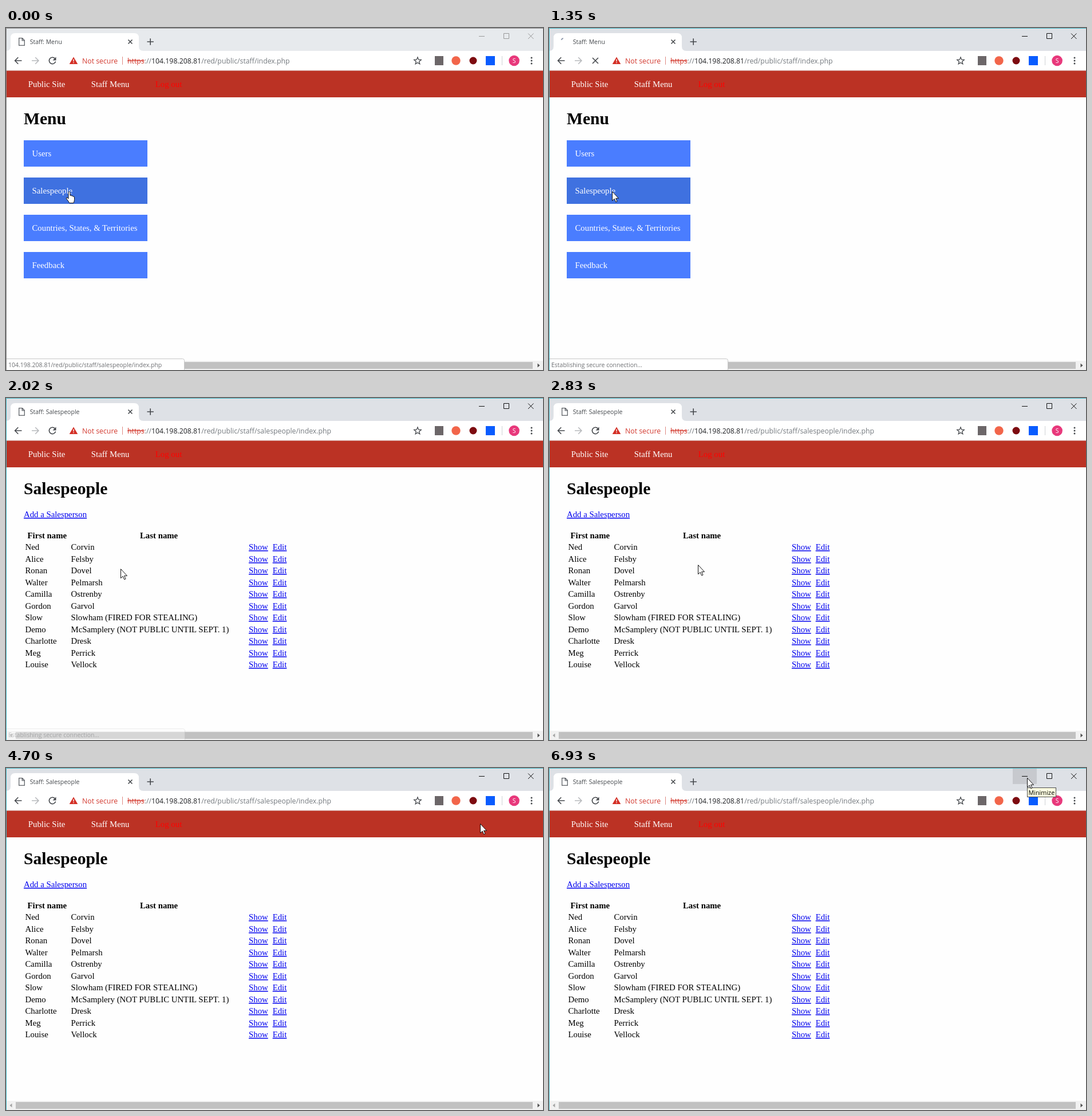
Recreate the animation shown at these times as an HTML page. Size 938 by 597 pixels, loop 8 s.

```html
<!DOCTYPE html>
<html lang="en">
<head>
<meta charset="utf-8">
<title>Staff pages</title>
<style>
  html, body { margin: 0; width: 100%; height: 100%; overflow: hidden; background: #fefefe; }
  svg { display: block; }
  text { white-space: pre; }
  rect { shape-rendering: crispEdges; }
  .soft { shape-rendering: auto; }
  .ui { font: 12.3px "Open Sans", "Noto Sans", sans-serif; }
  .small { font: 10.5px "Open Sans", "Noto Sans", sans-serif; }
  .page { font: 14.8px "Liberation Serif", serif; }
  .title { font: bold 29.6px "Liberation Serif", serif; }
  .bold { font-weight: bold; }
  .link { fill: #00e; text-decoration: underline; }
  .line { fill: none; stroke: #46494d; stroke-width: 1.6; }
</style>
</head>
<body>
<svg width="938" height="597" viewBox="0 0 938 597">
  <defs>
    <linearGradient id="fade">
      <stop offset="0" stop-color="#fff" stop-opacity="0"/>
      <stop offset="1" stop-color="#fff"/>
    </linearGradient>
  </defs>

  <!-- Title bar and tab -->
  <rect id="bar" width="938" height="40"/>
  <path d="M0 40Q8 40 8 32V17Q8 9 16 9H224Q232 9 232 17V32Q232 40 240 40Z" fill="#fff"/>
  <path id="docIcon" d="M22.7 17.7H28.5L32.3 21.5V30.3H22.7ZM28.2 17.7V21.8H32.3" fill="none" stroke="#5f6368" stroke-width="1.3"/>
  <path id="spinner" fill="none" stroke="#8d98ab" stroke-width="1.8"/>
  <text id="tabTitle" class="small" x="41.7" y="28" fill="#45494d"/>
  <rect x="183" y="14" width="22" height="20" fill="url(#fade)"/>
  <rect x="205" y="14" width="6" height="20" fill="#fff"/>
  <path class="line" d="M213.5 20.5l7 7m0-7l-7 7M246.5 24h11.4M252.2 18.3v11.4"/>
  <rect id="hover" x="810" y="1" width="42" height="27" fill="#c7c9ce"/>
  <path id="windowButtons" d="M826 14.5h10M869.5 9.5h9v9h-9ZM912 9.5l9.5 9.5m0-9.5l-9.5 9.5" fill="none"/>

  <!-- Toolbar -->
  <rect y="40" width="938" height="34" fill="#fff"/>
  <path class="line" d="M27.5 57H16M21.3 51.3L15.6 57l5.7 5.7"/>
  <path class="line" d="M45 57H56.5M51.2 51.3L56.9 57l-5.7 5.7" style="stroke:#b8babd"/>
  <g id="reload">
    <path class="line" d="M85.3 53A5.7 5.7 0 1 0 86.6 58.5"/>
    <path d="M87.5 50.5V56.5H81.5Z" fill="#46494d"/>
  </g>
  <path id="stop" class="line" d="M76 52l10 10m0-10l-10 10"/>
  <path d="M118 50.5L125.3 63H110.7Z" fill="#d32f25"/>
  <path d="M118 54.5v4M118 59.7v1.6" stroke="#fff" stroke-width="1.4"/>
  <text class="ui" x="133" y="61.5" fill="#d33a2f">Not secure</text>
  <rect x="203" y="50" width="1" height="14" fill="#e08a84"/>
  <text class="ui" x="212" y="61.5" fill="#757a7f"><tspan fill="#d33a2f" text-decoration="line-through">https</tspan>://<tspan fill="#202124">104.198.208.81</tspan><tspan id="path"/></text>
  <path d="M719 51l1.7 4.2 4.5.3-3.5 2.9 1.1 4.4-3.800-2.4-3.800 2.4 1.1-4.4-3.500-2.900 4.500-.3Z" fill="none" stroke="#46494d" stroke-width="1.3"/>
  <rect x="749" y="49" width="15" height="16" fill="#6c6668"/>
  <circle cx="786" cy="57" r="7.7" fill="#f2654a"/>
  <circle cx="816" cy="57" r="6.5" fill="#7d0b10"/>
  <rect x="838" y="49" width="16" height="16" fill="#0a5cff"/>
  <rect x="866" y="49" width="1" height="16" fill="#d0d2d5"/>
  <circle cx="887.6" cy="57" r="9.3" fill="#e8387b"/>
  <text class="small" x="887.6" y="60.7" fill="#fff" text-anchor="middle">S</text>
  <g fill="#46494d"><circle cx="918" cy="52" r="1.5"/><circle cx="918" cy="57" r="1.5"/><circle cx="918" cy="62" r="1.5"/></g>

  <!-- Page -->
  <rect class="soft" y="73.5" width="938" height="1" fill="#dcdde0"/>
  <rect class="soft" y="74.5" width="938" height="46.5" fill="#bb3224"/>
  <g class="page" fill="#fff">
    <text x="38.8" y="103">Public Site</text>
    <text x="148.8" y="103">Staff Menu</text>
    <text x="260.8" y="103" fill="#f00">Log out</text>
  </g>
  <g id="menu" class="page"><text class="title" x="31" y="168">Menu</text></g>
  <g id="people" class="page">
    <text class="title" x="31" y="168">Salespeople</text>
    <text class="link" x="31" y="208">Add a Salesperson</text>
    <text class="bold" x="37.5" y="245">First name</text>
    <text class="bold" x="234" y="245">Last name</text>
  </g>

  <!-- Scrollbar and status bubble -->
  <rect y="581" width="938" height="16" fill="#f1f1f1"/>
  <rect x="17" y="583" width="903" height="12" fill="#c1c1c1"/>
  <path d="M10.5 585.5v7l-4-3.5Z" fill="#a3a3a3"/>
  <path d="M928.5 585.5v7l4-3.5Z" fill="#505050"/>
  <g id="status">
    <path id="bubble" fill="#fff" stroke="#c6c6c6"/>
    <text id="statusText" class="small" x="4" y="591.7" fill="#6e7073"/>
  </g>

  <path id="frame" d="M.5 597V.5H938" fill="none"/>

  <g id="tooltip">
    <rect x="835" y="34" width="51" height="17" fill="#4b4b4b"/>
    <rect x="836" y="35" width="49" height="15" fill="#ffffe1"/>
    <text class="small" x="837.5" y="46.6" style="font-size:10.8px">Minimize</text>
  </g>
  <path id="cursor" fill="#fff" stroke="#111"/>
</svg>

<script>
const $ = id => document.getElementById(id);
const show = (id, visible) => $(id).setAttribute('visibility', visible ? 'visible' : 'hidden');
const set = (id, attributes) => {
  for (const key in attributes) $(id).setAttribute(key, attributes[key]);
};
function add(parent, tag, attributes, content = '') {
  const node = document.createElementNS('http://www.w3.org/2000/svg', tag);
  for (const key in attributes) node.setAttribute(key, attributes[key]);
  node.textContent = content;
  $(parent).append(node);
}

['Users', 'Salespeople', 'Countries, States, & Territories', 'Feedback'].forEach((label, i) => {
  const y = 195.6 + 65.1 * i;
  add('menu', 'rect', { x: 31, y, width: 216, height: 46.4, fill: i === 1 ? '#3f71e0' : '#4a7dff' });
  add('menu', 'text', { x: 45.5, y: Math.round(y + 28), fill: '#fff' }, label);
});

[
  ['Ned', 'Corvin'], ['Alice', 'Felsby'], ['Ronan', 'Dovel'], ['Walter', 'Pelmarsh'],
  ['Camilla', 'Ostrenby'], ['Gordon', 'Garvol'], ['Slow', 'Slowham (FIRED FOR STEALING)'],
  ['Demo', 'McSamplery (NOT PUBLIC UNTIL SEPT. 1)'], ['Charlotte', 'Dresk'],
  ['Meg', 'Perrick'], ['Louise', 'Vellock']
].forEach(([first, last], i) => {
  const y = Math.round(265.2 + 20.5 * i);
  add('people', 'text', { x: 33.5, y }, first);
  add('people', 'text', { x: 113.5, y }, last);
  add('people', 'text', { x: 424, y, class: 'link' }, 'Show');
  add('people', 'text', { x: 465.7, y, class: 'link' }, 'Edit');
});

const ARROW = 'M.5 .5V16.5L4.2 13.2 6.7 18.8 9 17.8 6.6 12.3H11.5Z';
const HAND = 'M0 2.5Q0 .5 1.5 .5T3 2.5V7.3Q5.7 6.5 5.9 8.3Q8.3 7.5 8.5 9.3Q10.5 8.7 10.5 11V14.5Q10.5 17 9 20.5H1.8Q0 17 -3.5 13Q-4 10.5 -2 11L0 13Z';

// time, x, y: the pointer jumps from place to place
const POINTER = [
  [0, 109, 285], [1350, 110, 285], [1480, 120, 291], [1600, 215, 335], [1750, 309, 382],
  [1890, 290, 330], [2020, 200, 298], [2170, 108, 389], [2320, 131, 494], [2440, 329, 455],
  [2590, 333, 400], [2710, 300, 315], [2830, 260, 291], [2960, 220, 334], [3100, 311, 450],
  [3230, 220, 535], [3370, 290, 315], [3520, 178, 454], [4120, 186, 418], [4270, 210, 290],
  [4390, 235, 179], [4700, 828, 97], [4840, 871, 76], [5000, 871, 73], [5140, 862, 48],
  [5260, 843, 24], [5390, 836, 18], [5550, 835, 17]
];

function draw(t) {
  const active = t >= 1080;
  const loading = t >= 1350 && t < 1750;
  const arrived = t >= 1480;

  set('bar', { fill: t < 1080 ? '#e7eaed' : t < 1200 ? '#e2e5e9' : '#dee1e6' });
  set('frame', { stroke: active ? '#43b8c6' : '#8b8b8b' });
  set('windowButtons', { stroke: active ? '#111' : '#999' });
  show('hover', t >= 5260);

  show('docIcon', !loading);
  show('reload', !loading);
  show('stop', loading);
  show('spinner', loading);
  const step = t < 1480 ? 0 : t < 1600 ? 1 : 2;
  const end = (-110 + 65 * step) * Math.PI / 180;
  set('spinner', { d: `M21.4 20.7A6.5 6.5 0 0 1 ${27 + 6.5 * Math.cos(end)} ${24 + 6.5 * Math.sin(end)}` });
  $('tabTitle').textContent = !arrived ? 'Staff: Menu'
    : t < 1600 ? 'https://104.198.208.81/red/public' : 'Staff: Salespeople';
  $('path').textContent = `/red/public/staff/${arrived ? 'salespeople/' : ''}index.php`;

  show('menu', !arrived);
  show('people', arrived);

  const right = t < 280 ? 311.5 : 312.5;
  set('bubble', { d: `M-1 577.5H${right - 3}Q${right} 577.5 ${right} 580.5V598H-1Z` });
  $('statusText').textContent = t < 1350
    ? '104.198.208.81/red/public/staff/salespeople/index.php' : 'Establishing secure connection...';
  set('status', { opacity: t < 1890 ? 1 : t < 2020 ? 0.7 : t < 2170 ? 0.35 : 0 });

  set('tooltip', { opacity: t < 6790 ? 0 : t < 6930 ? 0.5 : 1 });
  const [, x, y] = POINTER.findLast(([time]) => time <= t);
  const hand = t < 1350 || (t >= 1480 && t < 1600);
  set('cursor', { d: hand ? HAND : ARROW, transform: `translate(${x} ${y})` });
}

function tick() {
  draw(performance.now() % 8000);
  requestAnimationFrame(tick);
}
tick();
</script>
</body>
</html>
```
